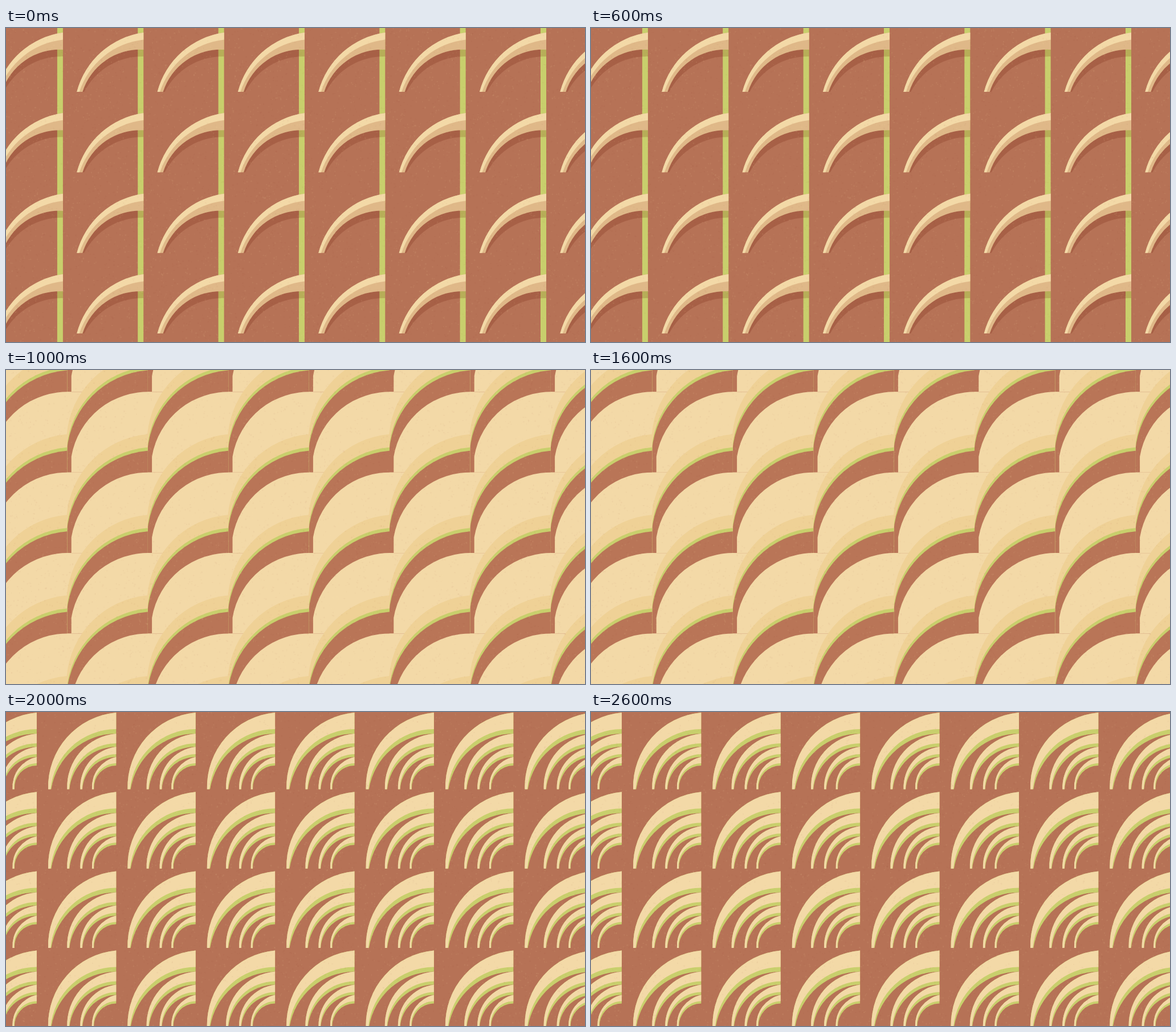
Animation of 1016x551 px, one loop 3000 ms. Source, as an HTML page with a canvas:

```html
<!DOCTYPE html>
<html lang="en">
<head>
<meta charset="utf-8">
<title>Three arc patterns</title>
<style>
html, body { margin: 0; width: 100%; height: 100%; overflow: hidden; background: #b67256; }
canvas { display: block; }
</style>
</head>
<body>
<canvas id="stage" width="1016" height="551"></canvas>
<script>
const WIDTH = 1016, HEIGHT = 551, SCENE_MS = 1000;
const BROWN = '#b67256', CREAM = '#f3d9a7', TAN = '#dfb888', GREEN = '#c8cf6c', SAND = '#efd196';
const ctx = document.getElementById('stage').getContext('2d');

function fillStage(color) {
  ctx.fillStyle = color;
  ctx.fillRect(0, 0, WIDTH, HEIGHT);
}

function fillPath(path, color) {
  ctx.fillStyle = color;
  ctx.fill(new Path2D(path));
}

// Repeats a tile row by row; each tile's origin is its top right corner.
function tileStage(startX, startY, stepX, stepY, drawTile) {
  for (let y = startY; y < HEIGHT + stepY; y += stepY) {
    for (let x = startX; x < WIDTH + stepX; x += stepX) {
      ctx.save();
      ctx.translate(x, y);
      drawTile();
      ctx.restore();
    }
  }
}

// Area between two arcs that run from the bottom line to the tile's right edge.
// Each arc is [x at the bottom, y at the right edge, radius].
function crescent(bottom, [x1, y1, r1], [x2, y2, r2], color) {
  fillPath(`M${x1} ${bottom} A${r1} ${r1} 0 0 1 0 ${y1} V${y2} A${r2} ${r2} 0 0 0 ${x2} ${bottom} Z`, color);
}

function horns() {
  const step = 141.35, bottom = 112;
  const outer = [-117, 8, 141], ridge = [-112.5, 20.5, 134];
  const inner = [-107, 38, 106], shade = [-104, 50, 114];
  fillStage(BROWN);
  tileStage(99.9, 0, step, step, () => {
    ctx.fillStyle = GREEN;
    ctx.fillRect(-10, 0, 10, step + 0.5);
  });
  tileStage(99.9, 0, step, step, () => {
    ctx.globalCompositeOperation = 'multiply';
    crescent(bottom, inner, shade, 'rgb(234,215,208)');
    ctx.globalCompositeOperation = 'source-over';
    crescent(bottom, outer, inner, TAN);
    crescent(bottom, outer, ridge, CREAM);
  });
}

function scales() {
  const size = 141.4, inset = 8, drop = 38, overlap = 0.7;
  // A scale whose curved side runs from its top right corner to the left side.
  const scale = (right, top, rise, radius, foot, color) =>
    fillPath(`M${right + overlap} ${top} H${right} A${radius} ${radius} 0 0 0 ${right - size} ${top + rise}
      V${foot} H${right + overlap} Z`, color);
  fillStage(CREAM);
  tileStage(114.7, 38.4 - size, size, size, () => {
    scale(-inset, -67, size, 155, size - drop, SAND);
    scale(-inset, -44, size, 155, size - drop, GREEN);
    scale(-inset, -drop, size, 155, size, '#b97557');
    scale(0, 0, 113.6, 136.5, size, CREAM);
  });
}

function ribs() {
  const bottom = 135.5;
  const bands = [
    { outer: [-119.3, 1, 131], rim: [-115, 30, 115.5], inner: [-114, 38, 115.5] },
    { outer: [-86, 38, 94], rim: [-82.5, 55, 82.6], inner: [-82, 61, 82.5] },
    { outer: [-63, 61, 72], rim: [-59.5, 74, 59.7], inner: [-59.3, 79, 59.5] },
    { outer: [-42.4, 79, 54], rim: [-39.2, 90, 39.8], inner: [-39, 94, 39.2] }
  ];
  fillStage(BROWN);
  tileStage(53.9, 0, 139.4, 139.2, () => {
    for (const { outer, rim, inner } of bands) {
      crescent(bottom, outer, inner, GREEN);
      crescent(bottom, outer, rim, CREAM);
    }
  });
}

// Faint paper grain from a seeded generator.
function grain(seed) {
  const random = () => (seed = (seed * 16807) % 2147483647) / 2147483647;
  for (let i = 0; i < 9000; i++) {
    ctx.fillStyle = random() < 0.5 ? 'rgba(255,225,170,.07)' : 'rgba(120,50,30,.03)';
    ctx.fillRect(random() * WIDTH, random() * HEIGHT, 1 + random() * 2, 1 + random() * 2);
  }
}

const scenes = [horns, scales, ribs];
let shown = -1;

function render() {
  const index = Math.floor(performance.now() / SCENE_MS) % scenes.length;
  if (index !== shown) {
    scenes[index]();
    grain(index * 977 + 41);
    shown = index;
  }
  requestAnimationFrame(render);
}
render();
</script>
</body>
</html>
```
